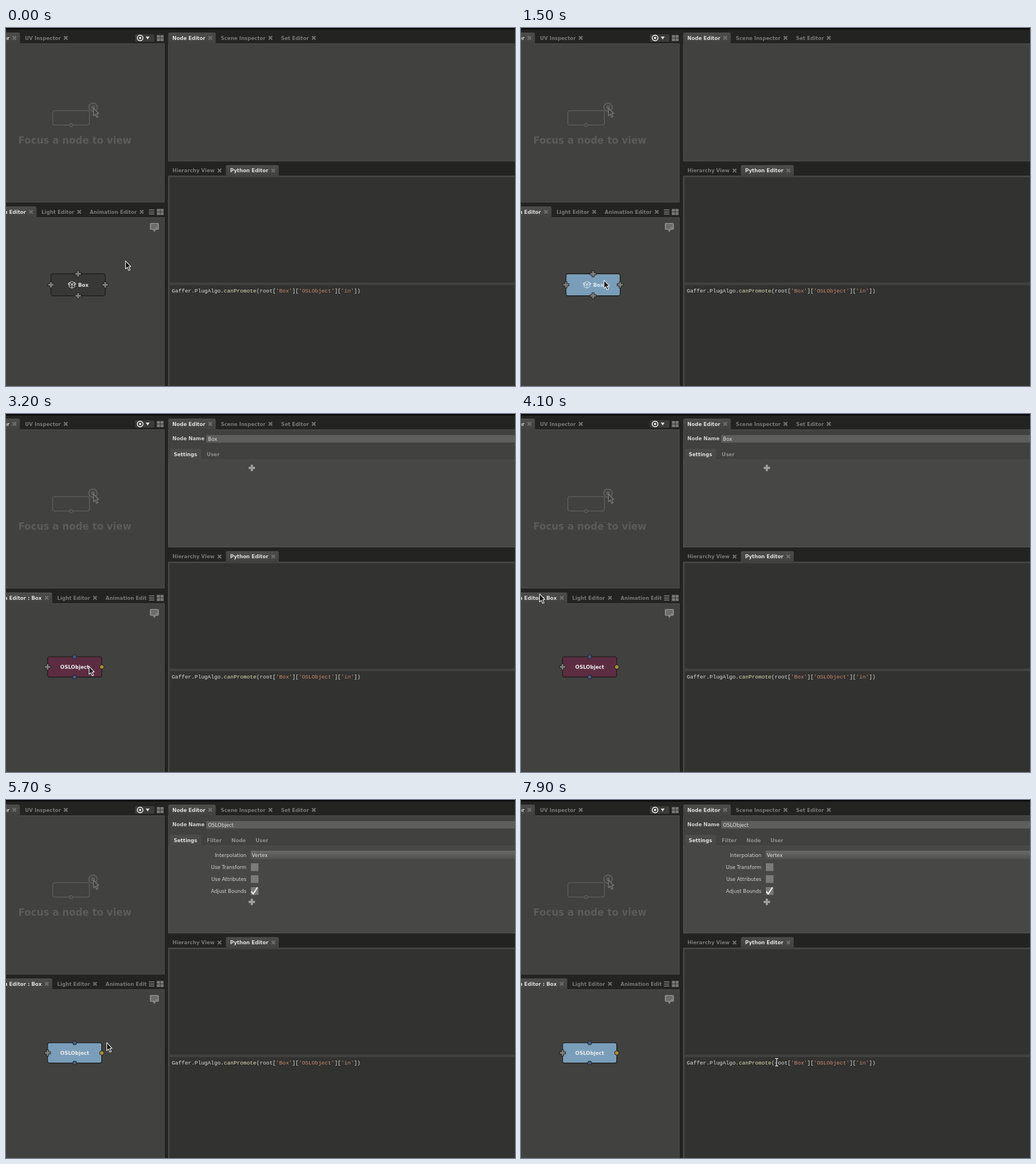
Write an HTML page with a canvas that moves like this. It is 892 px wide and 628 px high and loops after 8000 ms.

```html
<!DOCTYPE html>
<html lang="en">
<head>
<meta charset="utf-8">
<title>Node graph session</title>
<style>
html, body { margin: 0; width: 100%; height: 100%; overflow: hidden; background: #232322; }
canvas { display: block; }
</style>
</head>
<body>
<canvas id="stage" width="892" height="628"></canvas>
<script>
const ctx = document.getElementById('stage').getContext('2d');
const LOOP = 8000, TICK = 100;
const BAR = '#232322', PANEL = '#41413f', EDGE = '#4d4d4b', SUB = '#474745', CODE = '#323230';
const BRIGHT = '#dededd', SOFT = '#d2d2d1', DIM = '#777775', GHOST = '#5b5b59', INK = '#1e1e1d';
const BLUE = '#7a9eb9', PLUG = '#435a80';
const SANS = '"DejaVu Sans", sans-serif';
const UI = '8.67px ' + SANS, BOLD = 'bold ' + UI;

const EVENTS = { select: 1500, edit: 1600, enter: 3200, selectInner: 5300, beam: 7200 };
const HOVERS = [[3700, 3900], [5900, 6900]];

// Where the pointer rests, and when it travels there
const HOME = { x: 209, y: 408 };
const NODE = { x: 145, y: 442 }, IN_PLUG = { x: 124, y: 427 };
const MOVES = [
  { from: 1000, to: 1400, ...NODE },
  { from: 1600, to: 1600, x: 170, y: 418 },
  { from: 2000, to: 2000, x: 181, y: 412 },
  { from: 3200, to: 3200, ...NODE },
  { from: 3700, to: 3700, ...IN_PLUG },
  { from: 3900, to: 4100, x: 32, y: 315 },
  { from: 4200, to: 4600, x: 162, y: 440 },
  { from: 4800, to: 4900, x: 58, y: 441 },
  { from: 5000, to: 5200, x: 138, y: 441 },
  { from: 5600, to: 5700, x: 176, y: 425 },
  { from: 5800, to: 5900, ...IN_PLUG },
  { from: 6900, to: 7300, x: 485, y: 482 },
  { from: 7400, to: 7400, x: 493, y: 475 },
  { from: 7600, to: 7900, x: 448, y: 460 }
];

// The screen was sampled every tick, so the pointer advances in ticks too
function pointerAt(t) {
  let { x, y } = HOME;
  for (const m of MOVES) {
    if (t < m.from) break;
    const steps = (m.to - m.from) / TICK + 1;
    const p = Math.min(1, (Math.floor((t - m.from) / TICK) + 1) / steps);
    const k = p * p * (3 - 2 * p);
    x += (m.x - x) * k;
    y += (m.y - y) * k;
  }
  return [x, y];
}

function paint(fill, stroke, width) {
  if (fill) { ctx.fillStyle = fill; ctx.fill(); }
  if (stroke) { ctx.strokeStyle = stroke; ctx.lineWidth = width; ctx.stroke(); }
}

function rect(x, y, w, h, color) {
  ctx.fillStyle = color;
  ctx.fillRect(x, y, w, h);
}

function round(x, y, w, h, r, fill, stroke, width = 1) {
  ctx.beginPath();
  ctx.roundRect(x, y, w, h, r);
  paint(fill, stroke, width);
}

function circle(x, y, r, fill, stroke, width = 1) {
  ctx.beginPath();
  ctx.arc(x, y, r, 0, Math.PI * 2);
  paint(fill, stroke, width);
}

function polygon(points, fill, stroke, width = 1) {
  ctx.beginPath();
  points.forEach(([x, y]) => ctx.lineTo(x, y));
  ctx.closePath();
  paint(fill, stroke, width);
}

function line(color, width, ...points) {
  ctx.beginPath();
  points.forEach(([x, y]) => ctx.lineTo(x, y));
  paint(null, color, width);
}

function textWidth(str, font = BOLD) {
  ctx.font = font;
  return ctx.measureText(str).width;
}

function text(str, x, y, color = BRIGHT, font = BOLD, align = 'left') {
  ctx.font = font;
  ctx.textAlign = align;
  ctx.fillStyle = color;
  ctx.fillText(str, x, y);
}

function gradient(y, h, top, bottom) {
  const g = ctx.createLinearGradient(0, y, 0, y + h);
  g.addColorStop(0, top);
  g.addColorStop(1, bottom);
  return g;
}

function panel(x, y, w, h, fill = PANEL) {
  rect(x, y, w, h, EDGE);
  rect(x + 1, y + 1, w - 2, h - 2, fill);
}

function activeTab(x, y, w, h, bottom = PANEL) {
  round(x, y, w, h + 1, [3, 3, 0, 0], gradient(y, h, '#4c4c4a', bottom));
}

// Tabs sit one after another: label, close mark, gap
function tabRow(x, base, labels, active) {
  for (const label of labels) {
    const closeX = x + textWidth(label) + 8.7, cy = base - 3.2;
    if (label == active) activeTab(x - 7.3, base - 12.6, closeX - x + 17, 19);
    text(label, x, base, label == active ? BRIGHT : DIM);
    for (const s of [-3, 3]) line('#70706e', 2.2, [closeX - 3, cy - s], [closeX + 3, cy + s]);
    x = closeX + 18.5;
  }
}

function plus(x, y, color = '#7f7f7d', outline = INK) {
  const bars = (a, b, c) => {
    rect(x - a, y - b, 2 * a, 2 * b, c);
    rect(x - b, y - a, 2 * b, 2 * a, c);
  };
  if (outline) bars(5.8, 2.4, outline);
  bars(outline ? 4.8 : 5.6, outline ? 1.5 : 1.9, color);
}

function gridIcon(x, y) {
  for (const dx of [0, 6.3]) for (const dy of [0, 5.8]) rect(x + dx, y + dy, 5.6, 5, DIM);
}

function arrow(x, y, fill, stroke, width) {
  ctx.save();
  ctx.translate(x, y);
  ctx.lineJoin = 'round';
  polygon([[0.5, 0.7], [0.5, 14.6], [3.6, 11.8], [6, 17.3], [8.5, 16.2], [6, 10.9], [9.8, 10.4]],
    fill, stroke, width);
  ctx.restore();
}

function beam(x, y) {
  for (const [color, pad] of [['#1b1b1a', 0.9], ['#f0f0f0', 0]]) {
    const w = 1.3 + 2 * pad;
    line(color, w, [x, y - 6.5 - pad], [x, y + 6.5 + pad]);
    for (const end of [y - 6.5, y + 6.5]) line(color, w, [x - 3 - pad, end], [x + 3 + pad, end]);
  }
}

function viewer() {
  panel(-1, 27, 279, 279);
  tabRow(6 - textWidth('Viewer'), 20.6, ['Viewer', 'UV Inspector'], 'Viewer');
  round(226, 11, 34, 13, 2, '#3b3b39');
  circle(235, 17.5, 4.9, null, '#ededed', 1.6);
  circle(235, 17.5, 2, '#ededed');
  polygon([[245, 15], [251.6, 15], [248.3, 20.2]], '#dedede');
  gridIcon(264.3, 12.3);

  round(82, 145, 64.3, 25.3, 3.5, null, GHOST, 1.6);
  circle(114, 170.4, 2.6, PANEL, GHOST, 1.4);
  circle(152.5, 139, 7.3, null, GHOST, 2.4);
  circle(152.5, 139, 3.4, GHOST);
  arrow(152.8, 139.5, PANEL, DIM, 1.4);
  text('Focus a node to view', 21.5, 202.6, GHOST, 'bold 16.75px ' + SANS);
}

function graphHeader(inside) {
  panel(-1, 332, 279, 300);
  const title = inside ? 'Graph Editor : Box' : 'Graph Editor';
  ctx.save();
  ctx.beginPath();
  ctx.rect(0, 313, 247, 20);
  ctx.clip();
  tabRow(35 - textWidth('Graph Editor'), 325.7, [title, 'Light Editor', 'Animation Editor'], title);
  ctx.restore();
  for (let i = 0; i < 3; i++) rect(250.5, 318.4 + i * 3.6, 9.5, 1.5, '#858583');
  gridIcon(264.3, 317.3);

  round(252, 342, 16, 12, 2, '#858583');
  polygon([[257, 353.5], [263, 353.5], [260, 358]], '#858583');
  for (let i = 0; i < 3; i++) rect(254.5, 344.8 + i * 2.7, i == 2 ? 8 : 11, 1.1, '#484846');
}

function nodeFrame(x, y, h, fill) {
  round(x, y, 95, h, 3.5, fill, INK, 1.4);
}

function openBox(x, y, color) {
  for (const s of [-1, 1]) {
    line(color, 0.9, [x, y - 1.4], [x + 5.1 * s, y - 3.6], [x + 5.1 * s, y + 3.2], [x, y + 5.9]);
    line(color, 0.9, [x, y - 1.4], [x + 2.2 * s, y + 1], [x + 7 * s, y - 1.4], [x + 5.1 * s, y - 3.6], [x, y - 6]);
  }
  line(color, 0.9, [x, y - 1.4], [x, y + 5.9]);
}

function boxNode(selected) {
  const left = 78.8, top = 431.3, h = 38.5, cx = left + 47.5, cy = top + h / 2;
  nodeFrame(left, top, h, selected ? BLUE : '#383836');
  for (const x of [left, left + 95]) plus(x, cy);
  for (const y of [top, top + h]) plus(cx, y);
  const color = selected ? '#e2e9ef' : '#e6e6e6';
  openBox(115.6, 450.5, color);
  text('Box', 126.5, 453.7, color);
}

function oslNode(selected, hover) {
  const left = 72.8, top = 425.9, h = 35.6, cx = left + 47.5, cy = top + h / 2;
  nodeFrame(left, top, h, selected ? BLUE : '#5c2d41');
  plus(left, cy);
  circle(left + 95, cy, 3.8, '#a98a38', INK);
  circle(cx, top + h, 3.6, PLUG, INK);
  circle(cx, top, hover ? 7.7 : 3.6, hover ? '#6f96b5' : PLUG, INK, hover ? 1.5 : 1);
  if (hover) {
    ctx.save();
    ctx.translate(103.4, 412.4);
    ctx.rotate(Math.PI / 4);
    text('in', 0, 2.3, '#ececec', 'bold 12px ' + SANS);
    ctx.restore();
  }
  text('OSLObject', cx, 446.8, '#ececec', BOLD, 'center');
}

function subTabs(labels) {
  panel(285, 80, 610, 153, SUB);
  activeTab(287, 61, 55, 19, SUB);
  let x = 294;
  labels.forEach((label, i) => {
    text(label, x, 73.7, i ? '#8d8d8b' : BRIGHT);
    x += textWidth(label) + 17;
  });
}

function nodeEditor(node) {
  panel(284, 27, 612, 207);
  tabRow(291.5, 20.6, ['Node Editor', 'Scene Inspector', 'Set Editor'], 'Node Editor');
  if (!node) return;

  text('Node Name', 291.5, 46, '#cfcfce');
  rect(351, 37, 541, 13, '#5e5e5c');
  text(node, 354, 46.7, BRIGHT, UI);
  const isBox = node == 'Box';
  subTabs(isBox ? ['Settings', 'User'] : ['Settings', 'Filter', 'Node', 'User']);
  plus(430.8, isBox ? 94.6 : 178.8, '#a0a09e', null);
  if (isBox) return;

  text('Interpolation', 421.3, 99.7, SOFT, UI, 'right');
  rect(428.5, 89, 464, 15, gradient(89, 15, '#6a6a68', '#4f4f4d'));
  text('Vertex', 430.8, 99.7, BRIGHT, UI);
  ['Use Transform', 'Use Attributes', 'Adjust Bounds'].forEach((label, i) => {
    const y = 117.8 + i * 20.9;
    text(label, 421.3, y + 3.3, SOFT, UI, 'right');
    rect(429, y - 6.8, 13.4, 13.6, '#7b7b79');
  });
  line('#f4f4f4', 2.1, [430, 160.5], [433.3, 164.7], [440.6, 153.2]);
}

function pythonEditor() {
  panel(284, 259, 612, 373);
  tabRow(291.7, 253.2, ['Hierarchy View', 'Python Editor'], 'Python Editor');
  rect(287, 262, 605, 184.5, CODE);
  rect(287, 451, 605, 177, CODE);
  const font = '9.5px "Liberation Mono", monospace';
  const source = "Gaffer.PlugAlgo.canPromote(root['Box']['OSLObject']['in'])";
  let x = 290.6;
  for (const part of source.split(/('\w+'|canPromote)/)) {
    const color = part[0] == "'" ? '#c88a6e' : part == 'canPromote' ? '#dcdcb4' : '#dadad8';
    text(part, x, 463.6, color, font);
    x += textWidth(part, font);
  }
}

function draw(t) {
  const inside = t >= EVENTS.enter;
  const hover = HOVERS.some(([from, to]) => t >= from && t < to);
  const [x, y] = pointerAt(t);
  rect(0, 0, 892, 628, BAR);
  rect(0, 0, 892, 2.5, '#080808');
  viewer();
  graphHeader(inside);
  if (inside) oslNode(t >= EVENTS.selectInner, hover);
  else boxNode(t >= EVENTS.select);
  nodeEditor(t >= EVENTS.selectInner ? 'OSLObject' : t >= EVENTS.edit ? 'Box' : null);
  pythonEditor();
  if (t >= EVENTS.beam) beam(x, y);
  else arrow(x, y, '#151515', '#f2f2f2', 1.1);
}

const start = performance.now();
function loop() {
  draw((performance.now() - start) % LOOP);
  requestAnimationFrame(loop);
}
loop();
</script>
</body>
</html>
```
